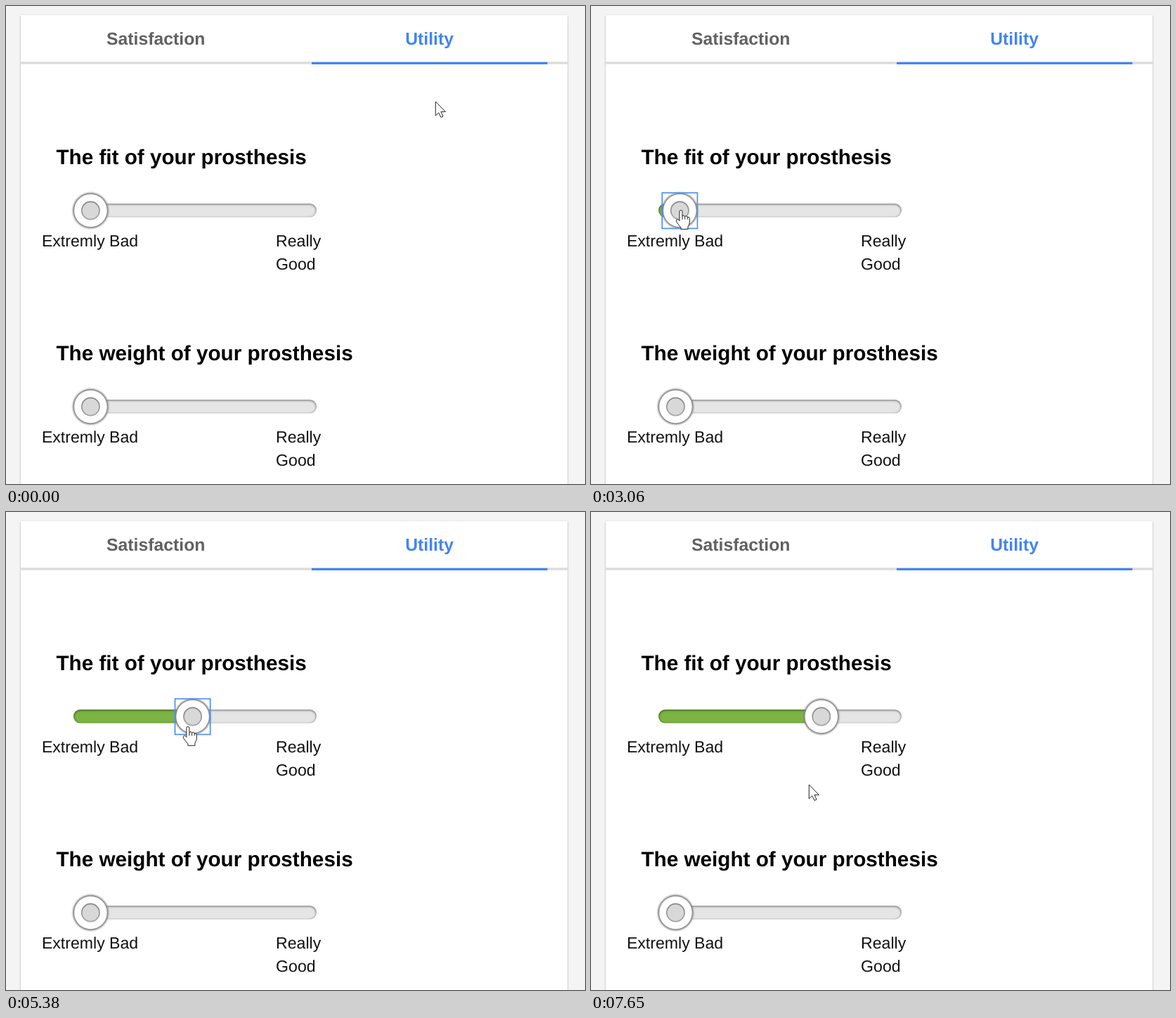
Animation of 824 by 680 pixels, one loop 8.21 s. Source, as an HTML page:

```html
<!DOCTYPE html>
<html lang="en">
<head>
<meta charset="utf-8">
<title>Slider survey</title>
<style>
  html, body { margin: 0; width: 100%; height: 100%; overflow: hidden; background: #f4f4f4; }
  svg { display: block; width: 824px; height: 680px; font-family: "Liberation Sans", Arial, sans-serif; text-rendering: geometricPrecision; }
  .tab { font-size: 24.75px; font-weight: bold; }
  .title { font-size: 29.7px; font-weight: bold; }
  .label { font-size: 23.1px; fill: #111; }
</style>
</head>
<body>
<svg id="stage" viewBox="0 0 824 680">
  <defs>
    <filter id="soft" x="-20%" y="-20%" width="140%" height="140%"><feGaussianBlur stdDeviation="1.2"/></filter>
    <filter id="inset" x="80" y="270" width="380" height="46" filterUnits="userSpaceOnUse"><feGaussianBlur stdDeviation="1.5"/></filter>
    <filter id="lift" x="0" y="0" width="824" height="720" filterUnits="userSpaceOnUse"><feGaussianBlur stdDeviation="1.8"/></filter>
    <clipPath id="trackShape"><rect x="96" y="281" width="346" height="19.5" rx="9.75"/></clipPath>
    <linearGradient id="rim" x2="0" y2="1"><stop stop-color="#858585"/><stop offset="1" stop-color="#a6a6a6"/></linearGradient>
  </defs>
  <rect width="824" height="680" fill="#f4f4f4"/>
  <rect x="21" y="14" width="778" height="700" fill="#000" opacity=".28" filter="url(#lift)"/>
  <rect x="21" y="13" width="778" height="667" fill="#fff"/>
  <rect x="21" y="79.3" width="778" height="3.4" fill="#dcdcdc"/>
  <rect x="435" y="79.8" width="335.5" height="3.2" fill="#4285f4"/>
  <text class="tab" x="143.1" y="55.3" fill="#616161">Satisfaction</text>
  <text class="tab" x="568.2" y="55.3" fill="#4285f4">Utility</text>
  <g id="questions"></g>
  <g id="pointer" stroke-linejoin="round" stroke-linecap="round" fill="#fff" stroke="#222">
    <path id="arrow" d="M.3 .3V20L4.7 15.8 8 22.4 11 21 8 14.4H14Z"/>
    <path id="hand" d="M-2 15V2Q-2 .3 0 .3T2 2V8.5Q4.4 6.4 5.7 9 8.2 7.4 9.3 10 12 9 12.4 12V17Q12.2 21 10 23.6V27.3H0V25Q-3 21.5-6.5 16.5-7 12.6-4.6 13ZM2 8.5V13M5.7 9V13M9.3 10V13"/>
  </g>
</svg>
<script>
const $ = id => document.getElementById(id);
const LOOP = 8210, START = 120.4, STEP = 2.963, AXIS = 291;
const PRESS = 2830, RELEASE = 6980, BLUR = 7600, LAG = 50;

const question = (id, title, dy) => `<g transform="translate(0 ${dy})">
  <text class="title" x="71.4" y="225.3">${title}</text>
  <g clip-path="url(#trackShape)">
    <rect x="96" y="281" width="346" height="19.5" fill="#e5e5e5"/>
    <rect id="${id}Fill" x="96" y="281" width="0" height="19.5" fill="#7cb342"/>
    <rect x="95" y="280.8" width="348" height="21.7" rx="10.8" fill="none" stroke="#000" stroke-width="3" opacity=".5" filter="url(#inset)"/>
  </g>
  <text class="label" x="50.9" y="342">Extremly Bad</text>
  <text class="label" x="384.1" y="342">Really</text>
  <text class="label" x="384.1" y="375">Good</text>
  <g id="${id}Knob" transform="translate(${START} ${AXIS})">
    <circle r="25.5" fill="#858585" filter="url(#soft)"/>
    <circle r="23.3" fill="#fff"/>
    <circle r="12.6" fill="#d8d8d8" stroke="url(#rim)" stroke-width="1.7"/>
    <rect id="${id}Focus" x="-25.1" y="-25.3" width="50.2" height="50.8" fill="none" stroke="#4d90ee" stroke-width="1.7" visibility="hidden"/>
  </g>
</g>`;
$("questions").innerHTML =
  question("fit", "The fit of your prosthesis", 0) +
  question("weight", "The weight of your prosthesis", 279);

// Turning points of the pointer: time, x, y
const path = [
  [500, 611, 136], [1420, 488, 432], [1760, 306, 366], [2170, 150, 296],
  [2580, 127, 289], [3010, 127, 290], [3730, 232, 298], [4340, 343, 298],
  [4700, 338, 306], [5380, 259, 305], [5790, 222, 302], [6360, 299, 298],
  [6900, 327, 299], [7630, 310, 388]
];

// Monotone cubic through the turning points, at rest at both ends
function along(axis, t) {
  const last = path.length - 1;
  if (t <= path[0][0]) return path[0][axis];
  if (t >= path[last][0]) return path[last][axis];
  const i = path.findIndex(p => p[0] > t) - 1;
  const rate = j => (path[j + 1][axis] - path[j][axis]) / (path[j + 1][0] - path[j][0]);
  const slope = j => {
    if (j === 0 || j === last) return 0;
    const a = rate(j - 1), b = rate(j);
    return a * b > 0 ? 2 * a * b / (a + b) : 0;
  };
  const h = path[i + 1][0] - path[i][0], u = (t - path[i][0]) / h, v = 1 - u;
  return v * v * ((1 + 2 * u) * path[i][axis] + u * h * slope(i))
       + u * u * ((1 + 2 * v) * path[i + 1][axis] - v * h * slope(i + 1));
}

// The knob trails the pointer while dragged, in whole slider steps
function sliderValue(t) {
  if (t < PRESS) return 0;
  const x = along(1, Math.min(t, RELEASE) - LAG);
  return Math.round((x - START) / STEP);
}

const show = (id, on) => $(id).setAttribute("visibility", on ? "visible" : "hidden");

function draw(t) {
  const x = along(1, t), y = along(2, t);
  const value = sliderValue(t), knob = START + value * STEP;
  const dragging = t >= PRESS && t < RELEASE;
  const hand = dragging || Math.hypot(x - knob, y - AXIS) < 26;
  $("fitKnob").setAttribute("transform", `translate(${knob} ${AXIS})`);
  $("fitFill").setAttribute("width", value ? knob - 96 : 0);
  show("fitFocus", t >= PRESS && t < BLUR);
  $("pointer").setAttribute("transform", `translate(${x} ${y})`);
  show("hand", hand);
  show("arrow", !hand);
}

const begin = performance.now();
function tick() {
  draw((performance.now() - begin) % LOOP);
  requestAnimationFrame(tick);
}
tick();
</script>
</body>
</html>
```
